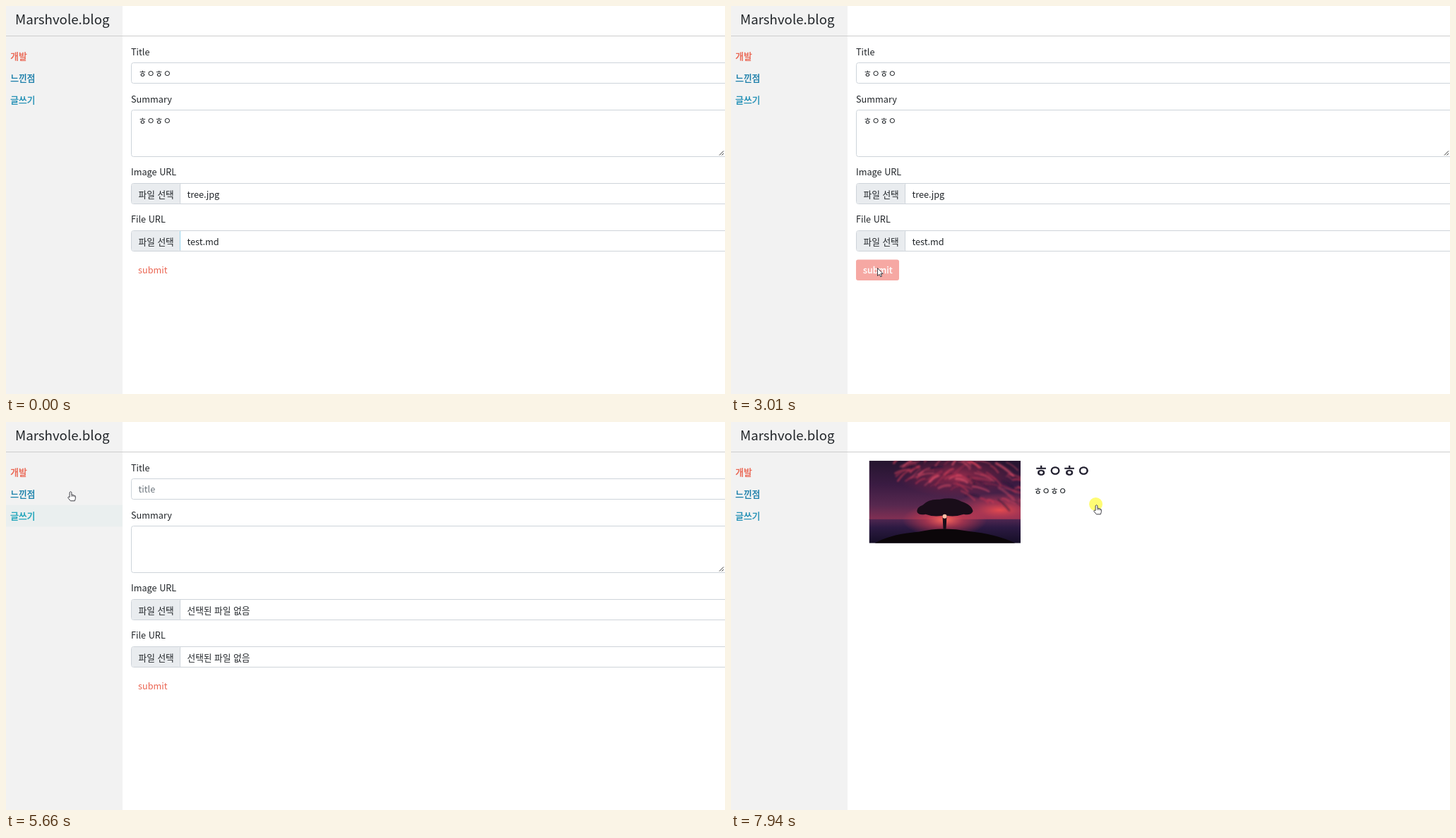
These frames come from a looping animation (1018x550 px, 8 s). An HTML page:

```html
<!DOCTYPE html>
<html lang="ko">
<head>
<meta charset="utf-8">
<title>Blog editor</title>
<style>
  html, body { margin: 0; width: 100%; height: 100%; overflow: hidden; background: #fff; }
  svg { display: block; width: 1018px; height: 550px; }
  text { font: 12.7px "Noto Sans CJK KR", "Noto Sans CJK", "Noto Sans", sans-serif; fill: #212529; white-space: pre; }
  .brand { font-size: 18.7px; font-weight: 300; }
  /* Thin outlines stand in for a medium weight */
  .link { fill: currentColor; stroke: currentColor; stroke-width: .35px; }
  .heading { font-size: 21.8px; fill: #1c1a2a; stroke: #1c1a2a; stroke-width: .6px; }
  .summary { stroke: #212529; stroke-width: .15px; }
  #plain text { font: 12.1px "Open Sans", "Noto Sans", sans-serif; }
  #plain .ko { font: 13.6px "Noto Sans CJK KR", "Noto Sans CJK", sans-serif; }
  #plain .anchor { font-size: 13.2px; fill: #2484f5; }
  text.hint { fill: #6c757d !important; }
</style>
</head>
<body>
<svg id="stage" viewBox="0 0 1018 550" xmlns="http://www.w3.org/2000/svg"></svg>
<script>
const LOOP = 8000;
const BRAND = 'Marshvole.blog';

const text = (x, y, str, cls = '', attrs = '') =>
  `<text x="${x}" y="${y}" class="${cls}" ${attrs}>${str}</text>`;
const rect = (x, y, w, h, fill, attrs = '') =>
  `<rect x="${x}" y="${y}" width="${w}" height="${h}" fill="${fill}" ${attrs}/>`;
const ellipse = (cx, cy, rx, ry, fill, attrs = '') =>
  `<ellipse cx="${cx}" cy="${cy}" rx="${rx}" ry="${ry}" fill="${fill}" ${attrs}/>`;
const path = (d, attrs) => `<path d="${d}" ${attrs}/>`;
const field = (x, y, w, h) => rect(x, y, w, h, '#fff', 'rx="3" stroke="#ced4da"');

function filePicker(x, y, w, buttonW, value) {
  return field(x, y, w, 29)
    + rect(x + .5, y + .5, buttonW - 1, 28, '#e9ecef', 'rx="2.5"')
    + path(`M${x + buttonW - .5} ${y + .5}v28`, 'stroke="#ced4da"')
    + text(x + 10, y + 20, '파일 선택', 'ko')
    + text(x + buttonW + 9.5, y + 20, value, /[a-z]/.test(value) ? '' : 'ko');
}

function form({ x, y, w, buttonW, title, summary, image, file }) {
  const none = '선택된 파일 없음';
  return text(x - .5, y, 'Title')
    + field(x, y + 11, w, 29)
    + text(x + 10, y + 30.5, title || 'title', title ? '' : 'hint')
    + text(x - .5, y + 67, 'Summary')
    + field(x, y + 78, w, 66)
    + text(x + 10, y + 97.5, summary || '')
    + path(`M${Math.min(x + w, 1018) - 8} ${y + 142}l6 -6m-2.5 6l2.5 -2.5`, 'stroke="#333" fill="none"')
    + text(x - .5, y + 170.5, 'Image URL')
    + filePicker(x, y + 182, w, buttonW, image || none)
    + text(x - .5, y + 237.5, 'File URL')
    + filePicker(x, y + 249, w, buttonW, file || none);
}

const pageForm = { x: 177.5, y: 69.5, w: 860, buttonW: 69.5 };
const rows = [['개발', '#ea5f4b', 71], ['느낀점', '#0f78a6', 102], ['글쓰기', '#1a8cb3', 133]];

const frameMarkup = rect(0, 0, 165, 550, '#f2f2f2')
  + rows.map(([label, color, mid], i) =>
      rect(0, mid - 15.5, 165, 31, '#e4eeee', `id="rowBg${i}"`)
      + text(6.3, mid + 4.6, label, 'link', `style="color:${color}"`)
      + text(6.3, mid + 4.6, label, 'link', `style="color:#36c6c6" id="rowText${i}"`)).join('')
  + path('M0 42.5H1018', 'stroke="#cdcdcd"')
  + text(13, 25.5, BRAND, 'brand');

const submitMarkup = text(187, 379.3, 'submit', '', 'style="fill:#eb6552"')
  + `<g id="submitHover">${rect(177, 359.5, 61, 29.5, '#f6a8a3', 'rx="3"')}`
  + text(187, 379.3, 'submit', '', 'style="fill:#fff;stroke:#fff;stroke-width:.3"') + '</g>';

const plainMarkup = text(6, 19, BRAND)
  + path('M0 36.5H165', 'stroke="#d5d5d5"')
  + path('M165.5 0V43.5H1018', 'stroke="#c4c4c4" fill="none"')
  + path('M166 44.5H1018', 'stroke="#e6e6e6"')
  + rows.map(([label, , mid]) => text(6.5, mid - 2, label, 'ko anchor')).join('')
  + form({ x: 3.5, y: 169, w: 1005.5, buttonW: 74 })
  + text(13, 478.5, 'submit');

function seeded(seed) {
  return () => (seed = seed * 16807 % 2147483647) / 2147483647;
}

// Feathery clouds rising to both sides of the tree
function wisps(count) {
  const random = seeded(77);
  const colors = ['#d23f58', '#b0304f', '#e0506a', '#2a1838'];
  let markup = '';
  for (let i = 0; i < count; i++) {
    const x = 35 + random() * 180;
    const y = random() * (20 + x * .22);
    const angle = (x < 120 ? -.5 : .45) + (random() - .5) * .7;
    const length = 8 + random() * 22;
    const dx = length * Math.cos(angle), dy = length * Math.sin(angle);
    const color = colors[Math.floor(random() * colors.length)];
    markup += path(`M${x} ${y}q${dx / 2} ${dy / 2 - 3} ${dx} ${dy}`,
      `stroke="${color}" stroke-width="${1 + random() * 2.5}" opacity="${.35 + random() * .35}"`);
  }
  return `<g fill="none" stroke-linecap="round" filter="url(#soft)">${markup}</g>`;
}

// Sunset behind a lone tree, in local coordinates
const photoMarkup = `<svg x="195.5" y="54.8" width="214.5" height="117" viewBox="0 0 214.5 117">`
  + rect(0, 0, 215, 84, 'url(#sky)')
  + ellipse(125, 22, 85, 30, 'url(#crimson)')
  + ellipse(185, 70, 75, 24, 'url(#ember)')
  + wisps(90)
  + rect(0, 83, 215, 34, 'url(#sea)')
  + ellipse(107, 84, 60, 24, 'url(#glow)')
  + path('M8 117Q30 104 70 101Q104 93 140 100Q180 104 207 117Z', 'fill="#0b0609"')
  + path('M68 73Q67 66 76 63Q84 54 100 55Q118 51 131 58Q146 63 147 72Q144 78 134 76Q122 80 110 78L109 97H105L104 78Q90 80 80 76Q71 78 68 73Z', 'fill="#190d19"')
  + ellipse(107, 79, 3, 3, '#ffc0a8')
  + '</svg>';

const gradient = (id, stops, kind = 'linear', attrs = 'x2="0" y2="1"') =>
  `<${kind}Gradient id="${id}" ${attrs}>${stops.map(([at, color, opacity = 1]) =>
    `<stop offset="${at}" stop-color="${color}" stop-opacity="${opacity}"/>`).join('')}</${kind}Gradient>`;
const halo = (id, core, edge) => gradient(id, [[0, core], [.45, edge, .6], [1, edge, 0]], 'radial', '');

const group = (id, markup) => `<g id="${id}">${markup}</g>`;

document.getElementById('stage').innerHTML = `<defs>
  ${gradient('sky', [[0, '#25152f'], [.4, '#3a1b42'], [.75, '#57284f'], [1, '#833053']])}
  ${gradient('sea', [[0, '#4e2650'], [.35, '#2c1a42'], [1, '#150e26']])}
  ${halo('crimson', '#9a2c4c', '#7c2546')}
  ${halo('ember', '#e54a4e', '#c23a54')}
  ${halo('glow', '#ff6a5c', '#d63d50')}
  <filter id="soft" x="-10%" y="-10%" width="120%" height="120%"><feGaussianBlur stdDeviation=".8"/></filter>
</defs>`
  + group('page', frameMarkup)
  + group('filled', form({ ...pageForm, title: 'ㅎㅇㅎㅇ', summary: 'ㅎㅇㅎㅇ', image: 'tree.jpg', file: 'test.md' })
      + rect(246, 319, 1, 27, '#9dd6ee', 'id="focusEdge"'))
  + group('empty', form(pageForm))
  + group('submit', submitMarkup)
  + group('list', photoMarkup + text(429, 77, 'ㅎㅇㅎㅇ', 'heading') + text(428.7, 101.5, 'ㅎㅇㅎㅇ', 'summary'))
  + group('plain', plainMarkup)
  + '<circle id="click" r="9.5" fill="#fffc74"/>'
  + group('arrow', path('M0 0V11L2.6 8.8 4.3 12.3 6 11.6 4.4 8.1H7.6Z', 'fill="#fff" stroke="#2b2b33" stroke-width=".9"'))
  + group('hand', path('M-1.4 8V1.2Q0 -.9 1.4 1.2V5Q2.8 4 3.4 5.4Q4.9 4.6 5.4 6Q6.8 5.6 6.8 7.4V10L5.8 13.3H-.2L-3.8 8.8Q-3.4 6.8 -1.4 8Z', 'fill="#fff" stroke="#2b2b33" stroke-width=".9"')
      + path('M1.4 5v2.5M3.4 5.4v2.1M5.4 6v1.8', 'stroke="#2b2b33" stroke-width=".7"'));

const el = id => document.getElementById(id);
const show = (id, on) => { el(id).style.display = on ? '' : 'none'; };
const fade = (id, amount) => { el(id).style.opacity = amount; };
const within = (t, from, to) => t >= from && t < to;

// Pointer moves in discrete steps; ease holds the ease-out power per axis
const moves = [
  { start: 520, end: 1270, steps: 11, from: [1010, 560], to: [651, 426], ease: [1.5, 1.5] },
  { start: 1340, end: 2090, steps: 12, from: [651, 426], to: [207, 371], ease: [2.35, 2.2] },
  { start: 5240, end: 5990, steps: 12, from: [207, 371], to: [86, 15], ease: [3.6, 1.66] },
  { start: 7010, end: 7410, steps: 7, from: [86, 15], to: [517, 117], ease: [1.7, 1.7] }
];
const clicks = [[2880, 3010], [6120, 6270], [7940, LOOP]];
const rowHovers = [[5722, 5790], [5654, 5722], [5586, 5654]];

function pointerAt(t) {
  const move = moves.filter(m => t >= m.start).pop();
  if (!move) return null;
  const { start, end, steps, from, to, ease } = move;
  const step = Math.min(steps - 1, Math.floor((t - start + 10) * (steps - 1) / (end - start)));
  const left = 1 - (step + 1) / steps;
  return from.map((a, i) => a + (to[i] - a) * (1 - left ** ease[i]));
}

function hover(t, enter, leave, duration = 120) {
  if (t < enter) return 0;
  const peak = Math.min(1, (Math.min(t, leave) - enter) / duration);
  return Math.max(0, peak - Math.max(0, t - leave) / duration);
}

function overLink(t, x, y) {
  if (x < 165) return y < 42 || within(y, 56, 149);
  return t >= 6550 && x > 195 && within(y, 55, 172);
}

function render(t) {
  const unstyled = within(t, 4440, 4510);
  show('plain', unstyled);
  show('page', !unstyled);
  show('filled', t < 4440);
  show('empty', within(t, 4510, 6480));
  show('submit', !unstyled && t < 6480);
  show('list', t >= 6550);
  show('focusEdge', t < 130);

  fade('submitHover', hover(t, 1880, 4440) * (t < 4440) + hover(t, 4500, 5240));
  rowHovers.forEach(([enter, leave], i) => {
    const amount = hover(t, enter, leave);
    fade('rowBg' + i, amount);
    fade('rowText' + i, amount);
  });

  const pointer = pointerAt(t);
  const [x, y] = pointer ? pointer.map(Math.round) : [0, 0];
  const hand = overLink(t, x, y);
  show('arrow', pointer && !hand);
  show('hand', pointer && hand);
  for (const id of ['arrow', 'hand']) el(id).setAttribute('transform', `translate(${x + .5} ${y + .5})`);
  show('click', clicks.some(([from, to]) => within(t, from, to)));
  el('click').setAttribute('transform', `translate(${x - .5} ${y - .5})`);
}

const began = performance.now();
function tick() {
  render((performance.now() - began) % LOOP);
  requestAnimationFrame(tick);
}
tick();
</script>
</body>
</html>
```
